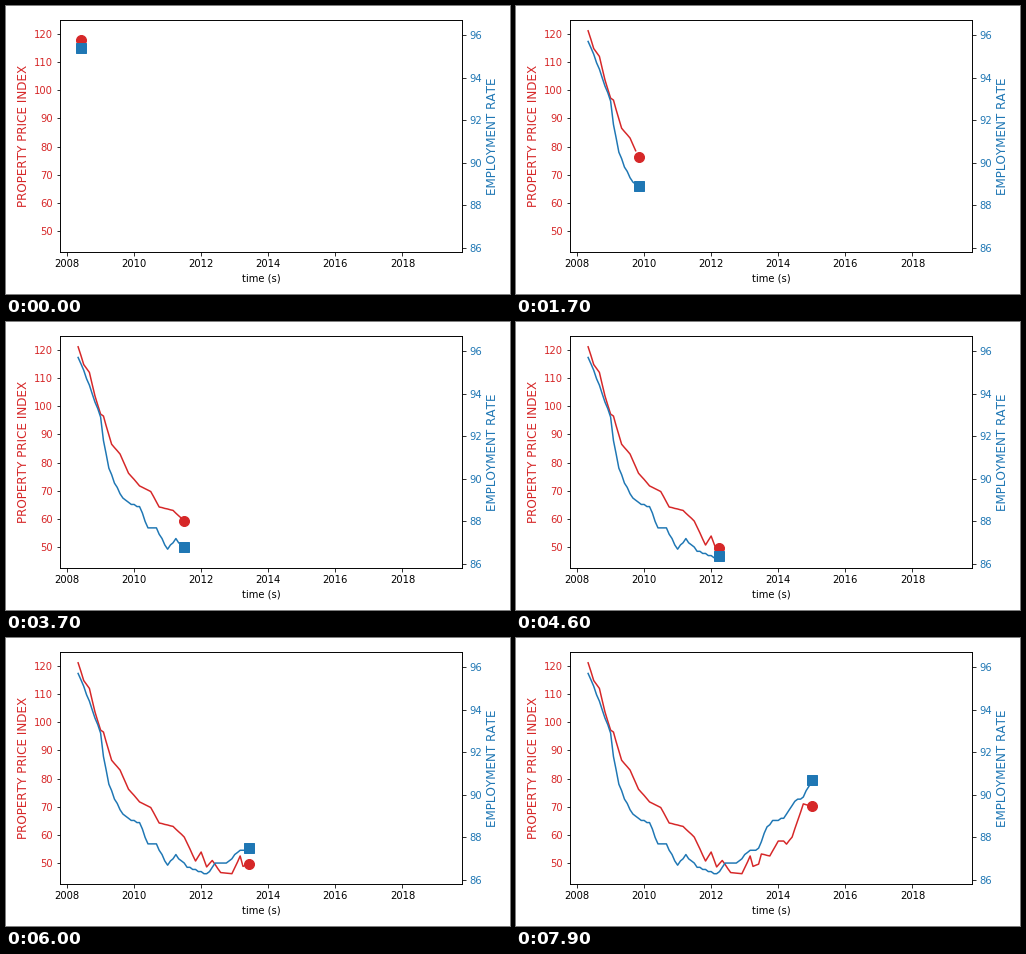
A matplotlib script for the animation above (8000 ms loop, 504 by 288 pixels).

```python
import numpy as np
import matplotlib.pyplot as plt
import matplotlib.dates as mdates
from matplotlib.animation import FuncAnimation

W, H, DPI = 504, 288, 72
LEFT, RIGHT, TOP, BOTTOM = 53.81, 456.46, 14.25, 246.25
FRAMES, INTERVAL = 80, 100

# turning points of each trend: (months since May 2008, value)
PRICE = [
    (0, 121.1), (2, 114.8), (4, 112), (6, 103.6), (8, 97.2), (9, 96.5),
    (12, 86.5), (15, 83), (18, 76.2), (22, 71.7), (26, 69.7), (29, 64.2),
    (34, 63), (38, 59.2), (42, 50.7), (44, 53.9), (46, 48.6), (48, 50.9),
    (51, 46.6), (55, 46.2), (58, 52.5), (59, 48.8), (61, 49.6), (62, 53.2),
    (65, 52.5), (68, 57.8), (70, 57.8), (71, 56.7), (73, 59.2), (77, 71),
    (80, 70.1),
]
EMPLOYMENT = [
    (0, 95.7), (2, 95.1), (8, 92.9), (9, 91.8), (11, 90.5), (13, 89.8),
    (16, 89.1), (19, 88.8), (22, 88.7), (25, 87.7), (28, 87.7), (29, 87.4),
    (32, 86.7), (35, 87.2), (39, 86.6), (46, 86.3), (47, 86.4), (49, 86.8),
    (53, 86.8), (58, 87.4), (60, 87.4), (61, 87.5), (64, 88.5), (66, 88.8),
    (70, 88.9), (74, 89.7), (77, 89.9), (80, 90.7),
]

plt.rcParams["text.kerning_factor"] = 6

months = np.arange("2008-05", "2019-05", dtype="datetime64[M]")
days = mdates.date2num(months.astype("datetime64[D]"))


def monthly(points):
    """One value per month, to one decimal like published figures."""
    return np.round(np.interp(np.arange(FRAMES + 1), *zip(*points)), 1)


def padded(lo, hi, margin=0.05):
    pad = margin * (hi - lo)
    return lo - pad, hi + pad


def add_series(ax, label, color, marker, points, limits):
    ax.set_ylim(*padded(*limits))
    ax.set_ylabel(label, color=color, fontsize=12)
    ax.tick_params(axis="y", labelcolor=color)
    line, = ax.plot([], [], color=color, lw=1.5)
    head, = ax.plot([], [], color=color, marker=marker, ms=10, ls="none")
    return line, head, monthly(points)


fig, ax1 = plt.subplots(figsize=(W / DPI, H / DPI), dpi=DPI)
fig.subplots_adjust(left=LEFT / W, right=RIGHT / W,
                    top=1 - TOP / H, bottom=1 - BOTTOM / H)
ax2 = ax1.twinx()
series = [
    add_series(ax1, "PROPERTY PRICE INDEX", "tab:red", "o",
               PRICE, (46.2, 121.1)),
    add_series(ax2, "EMPLOYMENT RATE", "tab:blue", "s",
               EMPLOYMENT, (86.3, 96.2)),
]

ax1.set_xlabel("time (s)")
ax1.set_xlim(*padded(days[0], days[-1]))
ax1.xaxis.set_major_locator(mdates.YearLocator(2))
ax1.xaxis.set_major_formatter(mdates.DateFormatter("%Y"))


def update(i):
    # the marker runs one month ahead of its line
    n = i + 1
    for line, head, values in series:
        line.set_data(days[:n], values[:n])
        head.set_data([days[n]], [values[n]])
    return [artist for s in series for artist in s[:2]]


anim = FuncAnimation(fig, update, frames=FRAMES, interval=INTERVAL,
                     repeat=True, repeat_delay=0)
plt.show()
```
